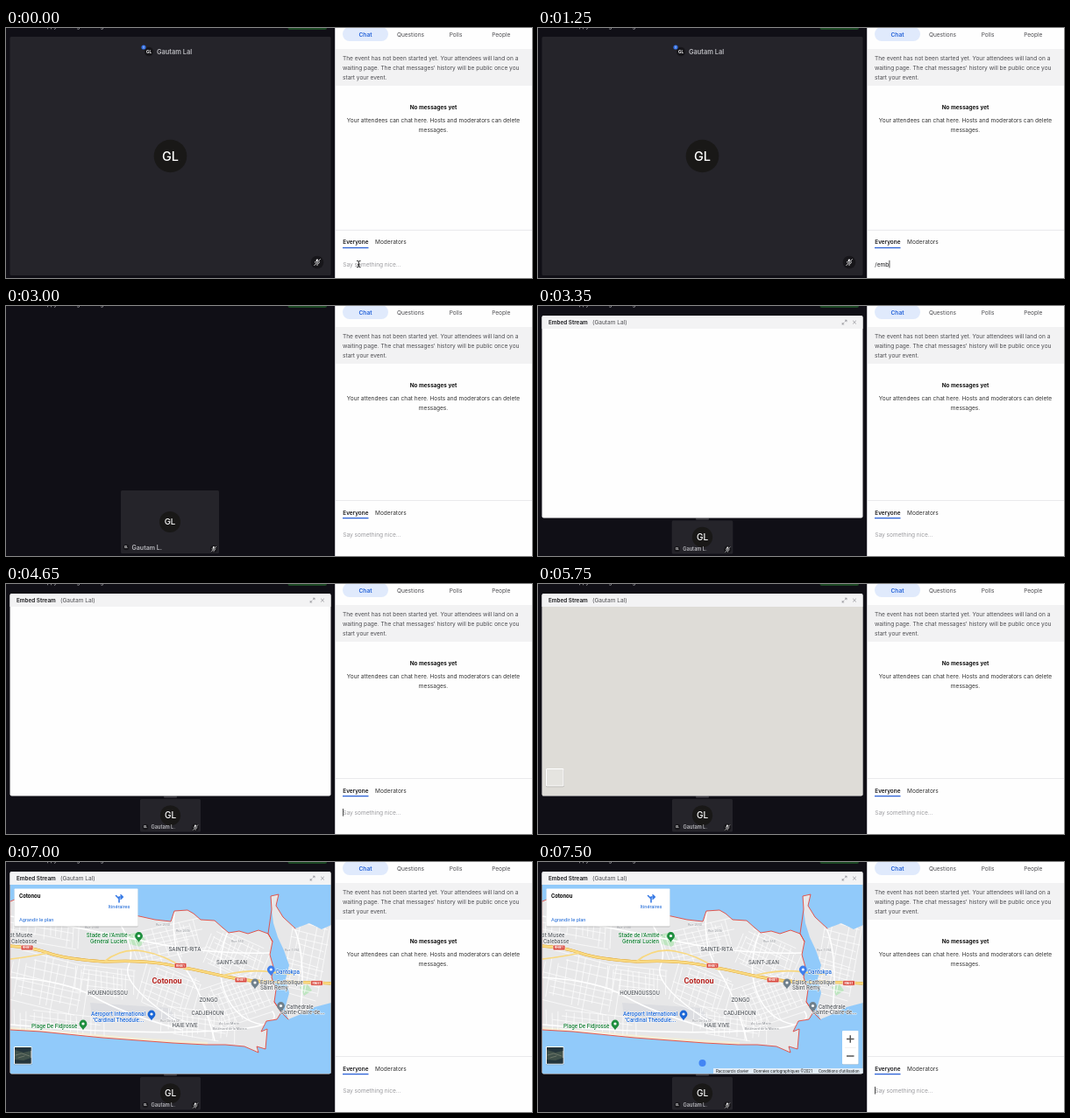
Animation of 600x286 px, one loop 7.55 s. Source, as an HTML page:

```html
<!DOCTYPE html>
<html lang="en">
<head>
<meta charset="utf-8">
<title>Embedded map in a live event</title>
<style>
  html, body { margin: 0; width: 100%; height: 100%; overflow: hidden; background: #0f0e15; }
  svg { display: block; width: 100vw; height: 100vh; }
  text { font: 6.55px Inter, sans-serif; fill: #4c4c50; }
  .mid { text-anchor: middle; }
  .end { text-anchor: end; }
  .strong { font-weight: 600; fill: #18181b; }
  .hint { fill: #9a9a9e; }
  .name { font-weight: 600; fill: #b9b9be; }
  .face { font-weight: 500; fill: #fff; text-anchor: middle; }
  #map text { font: 500 6.3px Roboto, sans-serif; fill: #5f6368; paint-order: stroke; stroke: #fff; stroke-width: 1px; stroke-linejoin: round; }
  #map .green { fill: #188038; }
  #map .blue { fill: #1a66d6; }
  #map .city { font-size: 9px; font-weight: 700; fill: #b3201c; }
  #map .road { font-size: 3.8px; font-weight: 400; fill: #80848a; stroke-width: .6px; }
  #map .plain { stroke: none; }
  #map .foot { font-size: 4.6px; font-weight: 400; fill: #222; }
  #map .shield { font-size: 3.7px; font-weight: 700; fill: #fff; text-anchor: middle; }
  .line { fill: none; stroke-linejoin: round; stroke-linecap: round; }
</style>
</head>
<body>
<svg id="stage" viewBox="0 0 600 286" preserveAspectRatio="none">
  <defs>
    <path id="land" d="M5 45 L20 39 38 43 60 48 84 47 110 52 134 59 152 62 170 66 188 68 192 56 207 55 214 59 222 66 238 67 247 75 254 81 266 79 276 82 288 78 299 82 304 91 301 106 305 120 303 132 308 146 306 160 314 172 309 180 297 182 291 194 298 191 296 214 286 211 288 218 272 211 250 209 228 209 190 207 150 204 110 201 70 197 40 194 5 192Z"/>
    <path id="east" d="M302 39 L311 37 308 50 316 63 330 76 346 70 360 77 371 72 371 161 352 166 334 175 322 180 318 168 323 150 319 134 323 118 317 101 310 86 305 70 303 54Z"/>
    <clipPath id="frame"><rect x="5" y="26" width="365.5" height="216"/></clipPath>
    <clipPath id="ground"><use href="#land"/><use href="#east"/></clipPath>
    <clipPath id="early"><rect x="134" y="47" width="120" height="34"/><rect x="228" y="185" width="70" height="34"/></clipPath>
    <g id="mic" class="line" stroke="#fff">
      <rect x="-1.3" y="-3.6" width="2.6" height="4.6" rx="1.3" fill="#fff" stroke="none"/>
      <path d="M-2.5 -.6 A2.5 2.5 0 0 0 2.5 -.6 M0 2 V3.6" stroke-width=".7"/>
      <path d="M-3 3.4 L3.2 -3.4" stroke="#19181c" stroke-width="1.7"/>
      <path d="M-3.2 3.6 L3.4 -3.4" stroke-width=".8"/>
    </g>
    <g id="pin"><path d="M0 6.5 C-1 3.6 -4.4 2.4 -4.4 -1 A4.4 4.4 0 0 1 4.4 -1 C4.4 2.4 1 3.6 0 6.5Z"/><circle cy="-1" r="1.6" fill="#fff"/></g>
  </defs>

  <!-- left side -->
  <rect width="376" height="286" fill="#100f16"/>
  <text x="38" y=".3" style="fill:#d4d4d8">Happy Evening Meeting</text>
  <rect x="321.5" y="-8" width="44.500" height="10" rx="2" fill="#1d4a25"/>

  <rect id="tile" rx="1.5" fill="#25242a"/>
  <circle id="disc" fill="#191817"/>
  <text id="initials" class="face">GL</text>
  <g data-on="0-2900">
    <circle cx="163" cy="27" r="5.2" fill="#17161a"/>
    <text class="face" x="163" y="28.700" style="font-size:4.6px;font-weight:700">GL</text>
    <circle cx="157" cy="22" r="2.6" fill="#2f6be0"/>
    <path class="line" d="M157 20.800 V23.200" stroke="#fff" stroke-width=".6"/>
    <text class="name" x="172" y="29.600" style="font-size:7.4px">Gautam Lal</text>
    <circle cx="355" cy="268" r="7.300" fill="#17161a"/>
    <use href="#mic" x="355" y="268"/>
  </g>
  <g data-on="2950-7550">
    <circle id="dot" r="3.300" fill="#17161a"/>
    <text id="dotText" class="face" style="font-size:3px;font-weight:700">GL</text>
    <text id="tileName" class="name">Gautam L.</text>
    <circle id="micDisc" r="4.200" fill="#17161a"/>
    <use id="tileMic" href="#mic"/>
  </g>

  <!-- embed panel -->
  <g data-on="3050-7550" data-fade="250">
    <rect x="180" y="242.500" width="15" height="2.200" rx="1" fill="#3a393f"/>
    <rect x="4.500" y="11" width="366" height="231.500" rx="2" fill="#fefefe"/>
    <path d="M4.500 26 V13 a2 2 0 0 1 2 -2 H368.500 a2 2 0 0 1 2 2 V26Z" fill="#f3f3f4"/>
    <text class="strong" x="12" y="21" style="font-size:6.35px">Embed Stream</text>
    <text x="62" y="21">(Gautam Lal)</text>
    <path class="line" stroke="#8a8a90" stroke-width=".7" d="M350.200 18 L352 16.200 M350.400 16.200 H352 V17.800 M349 19.200 L347.200 21 M347.200 19.400 V21 H348.800 M359.400 17 L362.600 20.200 M362.600 17 L359.400 20.200"/>
  </g>

  <g id="map" clip-path="url(#frame)">
    <rect data-on="5750-7550" x="5" y="26" width="365.500" height="216" fill="#dedcd7"/>
    <g data-on="5850-7550">
      <rect x="5" y="26" width="365.500" height="216" fill="#91cafa"/>
      <g fill="#e7e7e8"><use href="#land"/><use href="#east"/></g>
      <g clip-path="url(#ground)">
        <path d="M96 161 L186 167 196 181 98 178Z" fill="#dcdde1"/>
        <path d="M139 83 L153 80 159 89 153 97 141 94Z M335 143 L344 140 349 147 340 153Z" fill="#bfe5c1"/>
        <path d="M5 189 L70 194 150 201 230 206 230 212 5 198Z" fill="#f3eed9"/>
        <g id="streets" class="line" stroke="#fff"></g>
        <g class="line" stroke="#fff" stroke-width="1.500">
          <path d="M5 62 Q90 76 160 91 T300 104 M5 132 Q70 136 100 154 T200 192 M120 56 Q150 96 140 118 T196 183 M192 58 Q188 98 206 124 T238 204 M252 82 Q238 120 250 150 T292 186 M5 186 Q120 197 220 194 T304 171 M330 78 Q342 110 336 170"/>
        </g>
        <g class="line">
          <path id="highway" d="M3 96 Q28 97 48 104 T112 114 Q150 112 176 116 T246 130 Q276 137 304 137 T372 139" stroke="#e5b550" stroke-width="3.200"/>
          <use href="#highway" style="stroke-width:2.200"/>
          <path d="M3 96 Q28 97 48 104 T112 114 Q150 112 176 116 T246 130 Q276 137 304 137 T372 139" stroke="#fbdc83" stroke-width="2.200"/>
          <path d="M5 111 Q30 108 48 104 M112 114 Q132 98 156 102 T206 123 M246 130 Q278 122 303 126 L327 128" stroke="#f8d87f" stroke-width="1.700"/>
        </g>
      </g>
      <path d="M301 137 L325 139 M302 126 L324 128" class="line" stroke="#f8d87f" stroke-width="1.800"/>
    </g>
    <g id="covers" fill="#dedcd7"></g>

    <rect data-on="6500-6700" x="134" y="47" width="120" height="34" fill="#7d8fa0" opacity=".38"/>
    <g class="line" stroke="#e5483d" stroke-width=".9">
      <use data-on="6450-6700" href="#land" clip-path="url(#early)"/>
      <g data-on="6700-7550"><use href="#land"/><path d="M304 91 L299 82 303 54 302 39 311 37 308 50 316 63 330 76 M306 160 L314 172 322 180"/></g>
    </g>
    <g id="labels"></g>

    <g data-on="5600-7550">
      <rect x="8.800" y="211.300" width="21" height="21" rx="1.500" fill="#000" opacity=".22"/>
      <rect x="9" y="211" width="20.500" height="20.500" rx="1.200" fill="#fff"/>
      <rect x="10" y="212" width="18.500" height="18.500" fill="#e5e4e0"/>
      <g data-on="6350-7550">
        <rect x="10" y="212" width="18.500" height="18.500" fill="#40514a"/>
        <path d="M10 212 H28.500 V216 L20 218 10 215Z M10 226 L20 227 28.500 224 V230.500 H10Z" fill="#24353c"/>
        <path class="line" d="M11 221 L18 219 27 222 M14 224 L21 222" stroke="#7d8474" stroke-width=".7"/>
      </g>
    </g>

    <g data-on="6900-7550">
      <rect x="9.500" y="31" width="141" height="43.500" rx="1" fill="#000" opacity=".18"/>
      <rect x="9.500" y="30.500" width="141" height="43" rx="1" fill="#fff"/>
      <text class="plain" x="15" y="41.200" style="font-weight:700;font-size:6.400px;fill:#111">Cotonou</text>
      <path class="line" d="M129 46 V42 L125.500 38.500 M129 42 V40 H132 M131 37.800 L133.300 40 131 42.200" stroke="#3478e5" stroke-width="1.600"/>
      <text class="plain blue mid" x="129" y="53.400" style="font-size:5.700px;font-weight:400">Itinéraires</text>
      <text class="plain blue" x="15" y="68.200" style="font-size:5.700px;font-weight:400">Agrandir le plan</text>
    </g>
    <g data-on="7050-7550">
      <rect x="347" y="193.500" width="18.500" height="38.500" rx="1" fill="#000" opacity=".2"/>
      <rect x="347" y="193" width="18.500" height="38.500" rx="1" fill="#fff"/>
      <path d="M350 212.300 H362.500" stroke="#e3e3e3" stroke-width=".6"/>
      <path d="M352 202.500 H360.500 M356.250 198.250 V206.750 M352 222 H360.500" stroke="#555" stroke-width="1.500"/>
    </g>
    <g data-on="7350-7550">
      <circle cx="187.500" cy="230" r="4" fill="#4285f4"/>
      <rect x="200" y="236" width="171" height="7" fill="#f7f7f7" opacity=".82"/>
      <text class="plain foot" x="203" y="240.900">Raccourcis clavier</text>
      <text class="plain foot" x="246" y="240.900">Données cartographiques ©2021</text>
      <text class="plain foot" x="320" y="240.900">Conditions d'utilisation</text>
    </g>
  </g>

  <!-- chat -->
  <rect x="375.500" width="225" height="286" fill="#fefefe"/>
  <path d="M375.500 0 V286" stroke="#d9d9dd" stroke-width=".8"/>
  <rect x="384" y="-1" width="52" height="16" rx="8" fill="#e0eafc"/>
  <g class="mid">
    <text x="410" y="10.200" style="font-weight:600;fill:#2160d8">Chat</text>
    <text x="461.500" y="10.200">Questions</text>
    <text x="513" y="10.200">Polls</text>
    <text x="564.800" y="10.200">People</text>
  </g>
  <rect x="376" y="24" width="224" height="42" fill="#f2f2f3"/>
  <text x="384" y="36.700">The event has not been started yet. Your attendees will land on a</text>
  <text x="384" y="47.900">waiting page. The chat messages' history will be public once you</text>
  <text x="384" y="59.100">start your event.</text>
  <g class="mid">
    <text class="strong" x="487.500" y="92.800" style="font-size:6.400px;font-weight:700;fill:#111">No messages yet</text>
    <text x="487.500" y="107.900" style="fill:#333">Your attendees can chat here. Hosts and moderators can delete</text>
    <text x="487.500" y="119.100" style="fill:#333">messages.</text>
  </g>
  <g id="composer">
    <path d="M376 222.500 H600" stroke="#e4e4e7" stroke-width=".8"/>
    <text class="strong" x="384.300" y="238.500" style="font-size:6.400px">Everyone</text>
    <text x="421" y="238.500" style="fill:#333">Moderators</text>
    <rect x="384" y="242" width="29.500" height="1.300" fill="#2c62d6"/>
    <text id="typed" x="384.300" y="264"></text>
    <text id="wrapped" x="384.300" y="273"></text>
    <rect id="caret" y="257" width=".8" height="8.600" fill="#222"/>
  </g>
  <path id="beam" class="line" d="M-1.900 -3.700 Q-.3 -3.700 0 -2.800 Q.3 -3.700 1.900 -3.700 M0 -2.800 V2.800 M-1.900 3.700 Q-.3 3.700 0 2.800 Q.3 3.700 1.900 3.700 M-1 .9 H1" stroke="#111" stroke-width=".9"/>
</svg>

<script>
const LOOP = 7550;
const $ = id => document.getElementById(id);
const add = (parent, tag, attrs, text) => {
  const el = document.createElementNS('http://www.w3.org/2000/svg', tag);
  for (const k in attrs) el.setAttribute(k, attrs[k]);
  if (text) el.textContent = text;
  return parent.appendChild(el);
};
const set = (id, attrs) => { for (const k in attrs) $(id).setAttribute(k, attrs[k]); };
const clamp = v => Math.max(0, Math.min(1, v));
const ease = v => 1 - (1 - v) ** 3;

// small street grids: centre, half extents, angle, spacing
let seed = 11;
const rnd = () => (seed = seed * 16807 % 2147483647) / 2147483647;
for (const [cx, cy, w, h, angle, gap] of [
  [45, 72, 42, 22, 8, 7], [50, 140, 46, 32, 12, 8], [112, 138, 34, 18, 5, 6], [185, 92, 42, 20, -14, 6],
  [185, 148, 34, 26, 20, 7], [262, 108, 36, 22, 24, 6], [265, 158, 38, 26, -20, 6], [344, 108, 24, 46, 12, 7],
  [220, 186, 44, 16, 8, 7], [60, 184, 52, 12, 5, 7]
]) {
  let d = '';
  for (let x = -w; x <= w; x += gap * (.7 + rnd() * .8)) d += `M${x} ${-h * (.5 + rnd() * .5)}L${x + rnd() * 4} ${h * (.5 + rnd() * .5)}`;
  for (let y = -h; y <= h; y += gap * (.7 + rnd() * .8)) d += `M${-w * (.5 + rnd() * .5)} ${y}L${w * (.5 + rnd() * .5)} ${y + rnd() * 4}`;
  add($('streets'), 'path', { d, transform: `translate(${cx} ${cy}) rotate(${angle})`, 'stroke-width': .65 });
}

// map squares that load one after another
for (let i = 0; i < 12; i++) {
  add($('covers'), 'rect', {
    x: 5 + (i % 4) * 91.4, y: 26 + (i / 4 | 0) * 72, width: 91.8, height: 72.4,
    'data-on': `5850-${5950 + (i * 5 % 12) * 30}`
  });
}

const LATE = '6700-7550', EARLY = '6450-6700', ALWAYS = '6350-7550';
for (const [x, y, text, cls = '', on = ALWAYS] of [
  [204, 102, 'SAINTE-RITA', 'mid'], [257.5, 116.5, 'SAINT-JEAN', 'mid'], [116, 152.3, 'HOUENOUSSOU', 'mid'],
  [231, 160.3, 'ZONGO', 'mid'], [230, 174.7, 'CADJEHOUN', 'mid'], [204, 189.3, 'HAIE VIVE', 'mid'],
  [273, 145.5, 'AINT-MICHEL', 'mid', EARLY], [183.5, 139, 'Cotonou', 'city mid'],
  [117, 86, "Stade de l'Amitié -", 'green mid'], [117, 92.7, 'Général Lucien', 'green mid'],
  [81.5, 189.6, 'Plage De Fidjrossè', 'green end'],
  [128, 176, 'Aéroport International', 'blue mid'], [128, 182.700, '"Cardinal Théodule...', 'blue mid'],
  [297, 127.300, 'Dantokpa', 'blue end', EARLY], [308, 127.700, 'Dantokpa', 'blue', LATE],
  [302, 177.300, 'Cotonou', 'blue end', EARLY],
  [152, 42, 'Bleu Zenith Signal', 'end', EARLY], [323, 128.300, 'Marlen Hyper O', '', EARLY],
  [290, 140, 'Église Catholique', '', LATE], [290, 146, 'Saint Rémy', '', LATE],
  [320, 167.500, 'Cathédrale', '', LATE], [313, 173.500, 'Sainte-Claire-de...', '', LATE],
  [4, 85.500, 'tit Musée', '', LATE], [6, 93, 'Calebasse', '', LATE],
  [90, 76, 'Rue 2300', 'road'], [171, 73, 'Rue 2650', 'road'], [194, 80, 'Rue 2656', 'road'], [257, 92, 'Rue 650', 'road'],
  [318, 102, 'Rue 1394', 'road'], [243, 186, 'Av. Luc-Marin', 'road'], [236, 192, 'Boulevard de la Marina', 'road'],
  [176, 183, 'Rue De La CP', 'road']
]) add($('labels'), 'text', { x, y, class: cls, 'data-on': on }, text);

for (const [x, y, fill, on = ALWAYS] of [
  [151.500, 85.500, '#1e8e3e'], [88, 186, '#1e8e3e'], [166, 175, '#1a66d6'], [302.300, 124, '#3f7fec'],
  [157.700, 38.500, '#70808c', EARLY], [284, 139, '#70808c', LATE], [313.500, 165.500, '#70808c', LATE]
]) add($('labels'), 'use', { href: '#pin', x, y, fill, 'data-on': on });
add($('labels'), 'rect', { x: 303.500, y: 172.300, width: 5.500, height: 5.500, rx: 1, fill: '#1a66d6', 'data-on': EARLY });

for (const [x, y] of [[24, 98], [199, 118.500], [268, 135], [354.500, 138.500]]) {
  const g = add($('labels'), 'g', { 'data-on': ALWAYS });
  add(g, 'rect', { x: x - 6.800, y: y - 2.800, width: 13.600, height: 5.600, rx: 1, fill: '#d8453b', stroke: '#fff', 'stroke-width': .5 });
  add(g, 'text', { x, y: y + 1.400, class: 'shield plain' }, 'RNIE1');
}

const timed = [...document.querySelectorAll('[data-on]')].map(el => {
  const [from, to] = el.dataset.on.split('-').map(Number);
  return { el, from, to, fade: +el.dataset.fade || 0 };
});

// time, x, y, width, height, disc radius, initials, name size, inset, base
const POSES = [
  [2850, 4.500, 10, 366, 273, 18.800, 14.500, 7, 6, 7],
  [3000, 131, 211, 112, 72, 12, 9.600, 7, 6, 7],
  [3050, 131, 211, 112, 72, 12, 9.600, 7, 6, 7],
  [3450, 153, 246, 69, 37.500, 11.600, 10, 5.600, 6, 5.500]
];
function pose(t) {
  let i = POSES.findIndex(p => p[0] > t);
  if (i === 0) return POSES[0];
  if (i < 0) return POSES[POSES.length - 1];
  const a = POSES[i - 1], b = POSES[i], k = ease((t - a[0]) / (b[0] - a[0]));
  return a.map((v, n) => v + (b[n] - v) * k);
}

const HINT = 'Say something nice...';
const TYPING = [
  [0, HINT], [650, '/'], [950, '/e'], [1000, '/em'], [1250, '/emb'], [1300, '/embe'], [1500, '/embed'],
  [1800, '/embed\u00a0'], [1950, '/embed https://maps.example.org/embed?pb=!1m18!1m12!1m3'], [2350, HINT]
];
const CARET = [[50, 2900], [3500, 4050], [4650, 5250], [5900, 6600], [7200, LOOP]];
const within = (t, spans) => spans.some(([a, b]) => t >= a && t < b);

function drawTile(t) {
  const [, x, y, width, height, r, big, small, inset, base] = pose(t);
  const cx = x + width / 2, cy = y + height / 2, foot = y + height - base;
  set('tile', { x, y, width, height });
  set('disc', { cx, cy, r });
  set('initials', { x: cx, y: cy + big * .36 });
  $('initials').style.fontSize = big + 'px';
  set('dot', { cx: x + inset, cy: foot });
  set('dotText', { x: x + inset, y: foot + 1.100 });
  set('tileName', { x: x + inset * 2 + .6, y: foot + small * .36 });
  $('tileName').style.fontSize = small + 'px';
  const mx = x + width - 6, my = y + height - 5;
  set('micDisc', { cx: mx, cy: my });
  set('tileMic', { transform: `translate(${mx} ${my}) scale(.8)` });
}

function drawComposer(t) {
  const text = TYPING.filter(s => s[0] <= t).pop()[1], pasted = within(t, [[1950, 2350]]);
  const typed = $('typed');
  typed.textContent = text;
  typed.setAttribute('class', text === HINT ? 'hint' : 'strong');
  typed.style.fontWeight = 400;
  $('wrapped').textContent = pasted ? '!1d63437.2!2d2.35!3d6.37!2m3!1f0!2f0!3f0!3m2!1i1024' : '';
  $('wrapped').style.fill = '#18181b';
  set('composer', { transform: `translate(0 ${t < 1950 ? 8.800 : 0})` });
  const line = pasted ? $('wrapped') : typed;
  set('caret', {
    x: 384.200 + (text === HINT ? 0 : line.getComputedTextLength() + .4),
    y: pasted ? 266 : 257,
    opacity: +within(t, CARET)
  });
  const by = t < 650 ? 270 : 256 + 13 * (1 - ease(clamp((t - 6350) / 200)));
  set('beam', { transform: `translate(402.300 ${by})`, opacity: +within(t, [[0, 650], [6350, 7000]]) });
}

const start = performance.now();
function draw() {
  const t = (performance.now() - start) % LOOP;
  for (const { el, from, to, fade } of timed) {
    const alpha = t < from || t >= to ? 0 : fade ? clamp((t - from) / fade) : 1;
    el.style.visibility = alpha ? '' : 'hidden';
    if (fade) el.style.opacity = alpha;
  }
  drawTile(t);
  drawComposer(t);
  requestAnimationFrame(draw);
}
draw();
</script>
</body>
</html>
```
